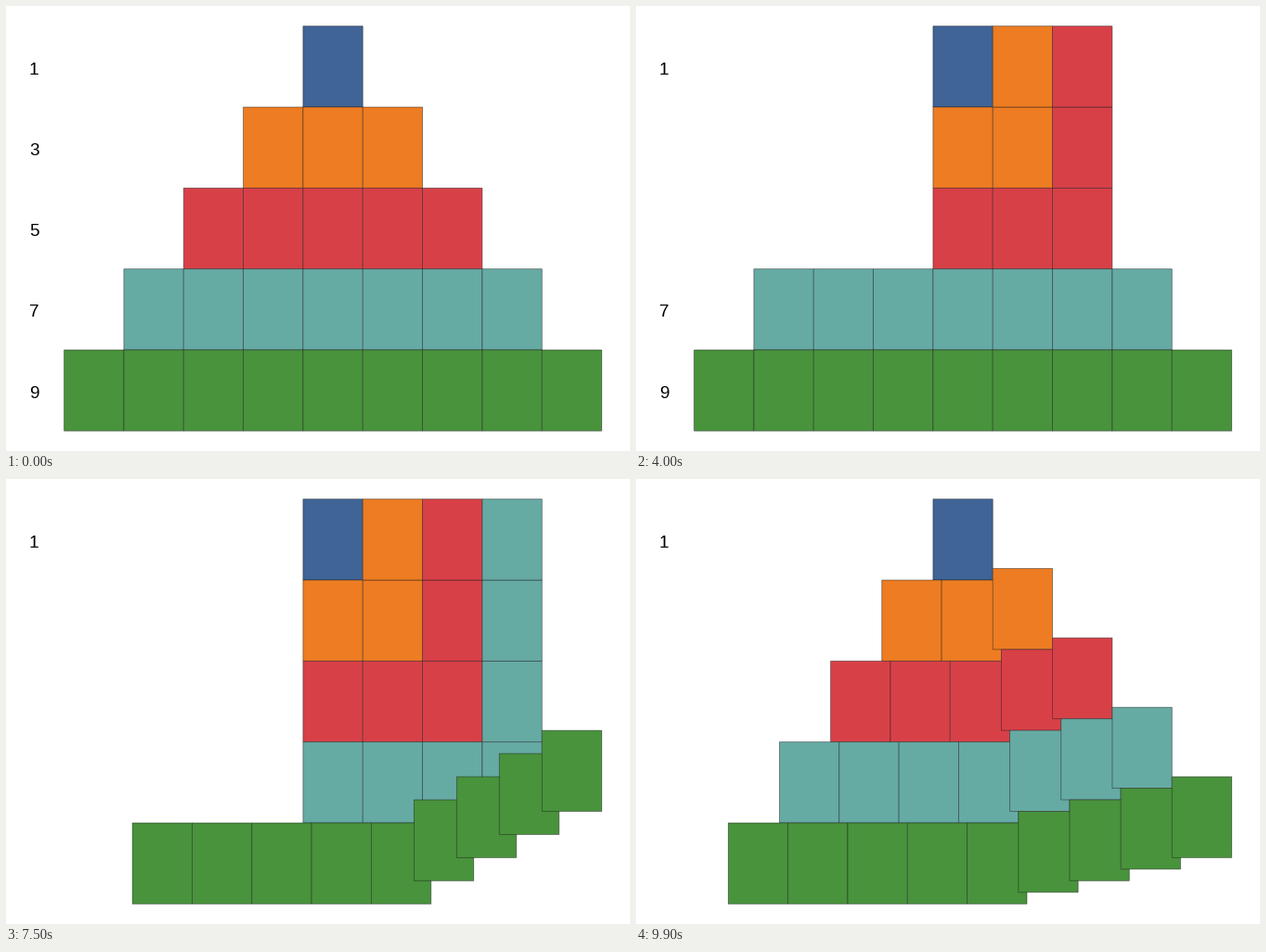
Recreate the animation shown at these times as a matplotlib script. Size 672 by 480 pixels, loop 10 s.

```python
import numpy as np
import matplotlib.pyplot as plt
from matplotlib.animation import FuncAnimation
from matplotlib.patches import Rectangle

W, H, DPI = 672, 480, 100
FRAMES, INTERVAL = 100, 100
CELL_W, CELL_H = 64.33, 87.32
LEFT, TOP = 319.9, 21.7          # corner of the top cell
STEPS = 7                        # frames per move
COLORS = ["#406496", "#ed7c22", "#d84047", "#66aaa4", "#48933c"]
PX = 72 / DPI                    # points per pixel

fig = plt.figure(figsize=(W / DPI, H / DPI), dpi=DPI, facecolor="white")
ax = fig.add_axes([0, 0, 1, 1])
ax.set_xlim(0, W)
ax.set_ylim(H, 0)
ax.axis("off")


def fold(frame, row):
    """How far a row is folded: 0 is a flat row, 1 is an L shape."""
    if row == 0:
        return 0.0
    out = np.clip((frame - 13 - 20 * (row - 1)) / STEPS, 0, 1)
    back = np.clip((frame - 93) / STEPS, 0, 1)
    return out - back


def cell_pos(row, j, t):
    """Column and row of cell j, counted from the left of the flat row."""
    if j <= row:
        return j - row * (1 - t), row
    end = 2 * row - j
    return row - end * (1 - t), row - (row - end) * t


cells, labels = [], []
for row, color in enumerate(COLORS):
    for j in range(2 * row + 1):
        rect = Rectangle((0, 0), CELL_W, CELL_H, facecolor=color,
                         edgecolor=(0.1, 0.1, 0.1, 0.55), linewidth=0.8 * PX,
                         joinstyle="miter", snap=False, zorder=1 + len(cells))
        ax.add_patch(rect)
        cells.append((row, j, rect))
    labels.append(ax.text(30.2, TOP + row * CELL_H + 51.8, str(2 * row + 1),
                          family="Liberation Sans", fontsize=19 * PX,
                          color="black", ha="center", va="baseline"))


def update(frame):
    for row, j, rect in cells:
        x, y = cell_pos(row, j, fold(frame, row))
        rect.set_xy((LEFT + x * CELL_W, TOP + y * CELL_H))
    for row, label in enumerate(labels):
        label.set_visible(fold(frame, row) == 0)
    return [c[2] for c in cells] + labels


anim = FuncAnimation(fig, update, frames=FRAMES, interval=INTERVAL,
                     repeat=True, repeat_delay=0, blit=False)
plt.show()
```
